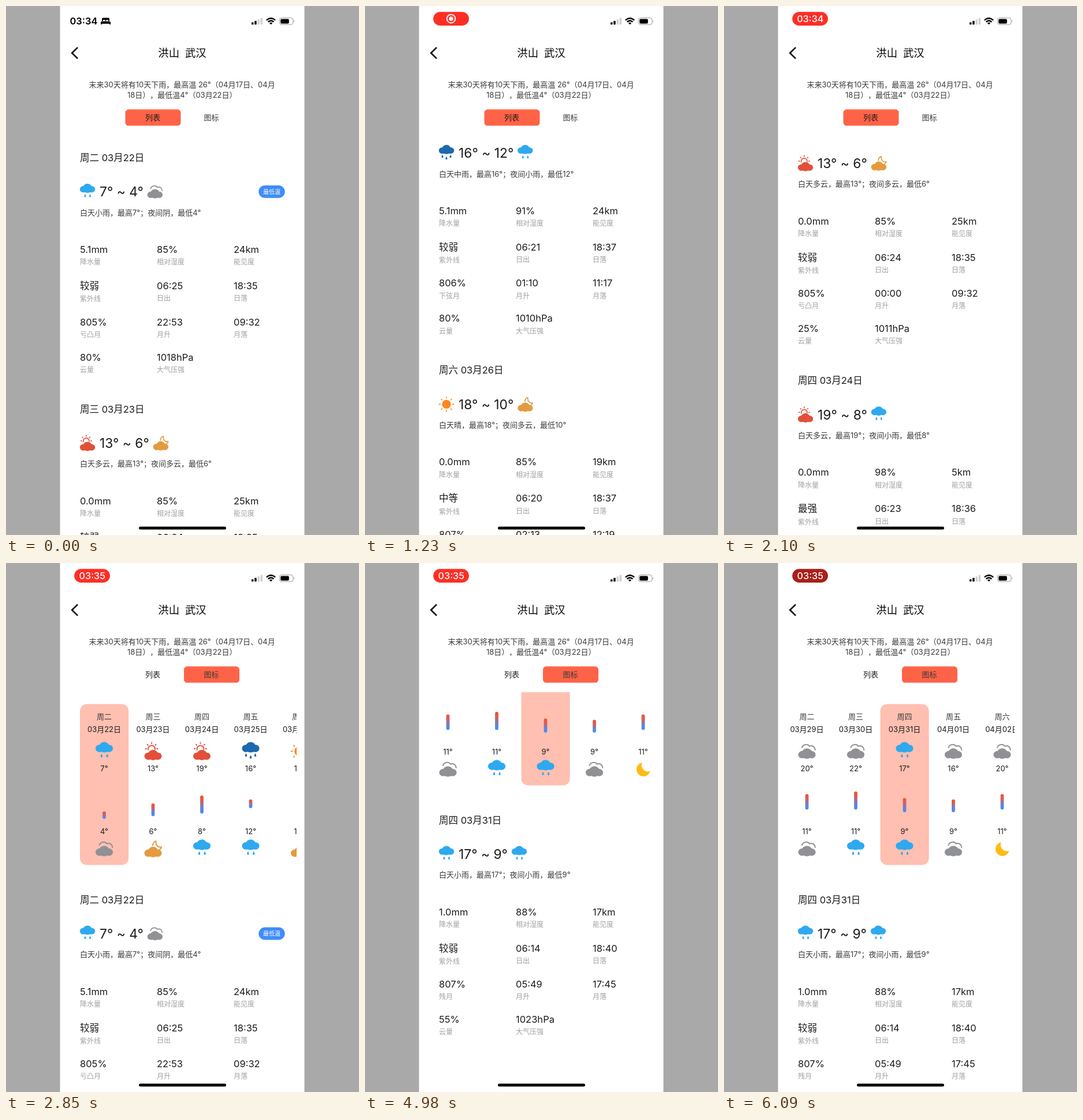
An HTML page for the animation above (6150 ms loop, 611x917 px).

```html
<!DOCTYPE html>
<html lang="zh-CN">
<head>
<meta charset="utf-8">
<title>天气</title>
<style>
html, body { margin: 0; width: 100%; height: 100%; overflow: hidden; background: #a9a9a9; }
svg { display: block; width: 611px; height: 917px; }
text {
  font-family: Inter, "Noto Sans CJK SC", "Noto Sans CJK", sans-serif;
  font-weight: 400; fill: #1c1c1c; white-space: pre; text-spacing-trim: space-all;
}
.soft { fill: #3a3a3a; }
.label { fill: #a0a0a0; }
.mid { text-anchor: middle; }
.bold { font-weight: 600; fill: #000; }
.medium { font-weight: 500; fill: #000; }
.white { fill: #fff; }
.line { fill: none; stroke-linecap: round; stroke-linejoin: round; stroke-width: 1.7; }
</style>
</head>
<body>
<svg id="stage" viewBox="0 0 611 917"></svg>
<script>
const LOOP = 6150, STEP = 30;
const DAY_PITCH = 435.6, COLUMN = 84.5, DETAIL_SHIFT = 320.5;
const LABELS = ['降水量', '相对湿度', '能见度', '紫外线', '日出', '日落', '', '月升', '月落', '云量', '大气压强'];

// weekday, date, day icon, high, night icon, low
const days = [
  ['周二', '03月22日', 'rain', 7, 'overcast', 4],
  ['周三', '03月23日', 'sunCloud', 13, 'moonCloud', 6],
  ['周四', '03月24日', 'sunCloud', 19, 'rain', 8],
  ['周五', '03月25日', 'heavyRain', 16, 'rain', 12],
  ['周六', '03月26日', 'sun', 18, 'moonCloud', 10],
  ['周日', '03月27日', 'sunCloud', 19, 'moonCloud', 11],
  ['周一', '03月28日', 'sunCloud', 20, 'overcast', 11],
  ['周二', '03月29日', 'overcast', 20, 'overcast', 11],
  ['周三', '03月30日', 'overcast', 22, 'rain', 11],
  ['周四', '03月31日', 'rain', 17, 'rain', 9],
  ['周五', '04月01日', 'overcast', 16, 'overcast', 9],
  ['周六', '04月02日', 'overcast', 20, 'moon', 11]
];
const skyNames = { rain: '小雨', heavyRain: '中雨', overcast: '阴', sunCloud: '多云', moonCloud: '多云', sun: '晴' };

// eleven readings followed by the moon phase
const readings = {
  0: '5.1mm 85% 24km 较弱 06:25 18:35 805% 22:53 09:32 80% 1018hPa 亏凸月',
  1: '0.0mm 85% 25km 较弱 06:24 18:35 805% 00:00 09:32 25% 1011hPa 亏凸月',
  2: '0.0mm 98% 5km 最强 06:23 18:36 806% 00:03 10:22 40% 1012hPa 下弦月',
  3: '5.1mm 91% 24km 较弱 06:21 18:37 806% 01:10 11:17 80% 1010hPa 下弦月',
  4: '0.0mm 85% 19km 中等 06:20 18:37 807% 02:13 12:19 25% 1012hPa 残月',
  9: '1.0mm 88% 17km 较弱 06:14 18:40 807% 05:49 17:45 55% 1023hPa 残月'
};

const text = (x, y, size, str, cls = '') =>
  `<text x="${x}" y="${y + size * 0.365}" font-size="${size}" class="${cls}">${str}</text>`;
const rect = (x, y, w, h, r, fill, extra = '') =>
  `<rect x="${x}" y="${y}" width="${w}" height="${h}" rx="${r}" fill="${fill}" ${extra}/>`;
const icon = (name, x, y, scale = 1) =>
  `<use href="#${name}" transform="translate(${x} ${y}) scale(${scale})"/>`;
const group = (id, body, extra = '') => `<g id="${id}" ${extra}>${body}</g>`;

function cloud(dy, color) {
  return `<g fill="${color}" transform="translate(0 ${dy})"><ellipse cy="-4" rx="8" ry="8"/>` +
    '<ellipse cx="-7" cy="-2.3" rx="6.2" ry="5.6"/><ellipse cx="7" cy="-2.3" rx="6.2" ry="5.6"/></g>';
}
const drop = (x, y, color) =>
  `<path d="M${x} ${y}q3.2 5 0 5.4q-3.2 -.4 0 -5.4z" fill="${color}"/>`;
const stroke = (d, color) => `<path class="line" d="${d}" stroke="${color}"/>`;
function rays(cx, cy, inner, outer, from, to, color) {
  let d = '';
  for (let a = from; a <= to; a += 45) {
    const c = Math.cos(a * Math.PI / 180), s = Math.sin(a * Math.PI / 180);
    d += `M${cx + c * inner} ${cy + s * inner}L${cx + c * outer} ${cy + s * outer}`;
  }
  return stroke(d, color);
}

function icons() {
  const blue = '#2ea9ef', navy = '#1c69ad', gray = '#909194', red = '#e25039', amber = '#e39b3e', orange = '#ff861c';
  return group('rain', cloud(0, blue) + drop(-4, 6, blue) + drop(4.5, 6, blue)) +
    group('heavyRain', cloud(0, navy) + drop(-7, 5, navy) + drop(0, 8, navy) + drop(7, 5, navy)) +
    group('overcast', cloud(9.5, gray) + stroke('M-7.5 -3.5C-5.5 -9 2 -9.5 4 -5.5C8 -7.5 12 -5 12.5 0', gray)) +
    group('sunCloud', cloud(11.8, red) + stroke('M-7.2 -.2A5.2 5.2 0 1 1 3 -.8', red) +
      rays(-2.2, -1.8, 8, 9.2, -180, 0, red)) +
    group('moonCloud', cloud(11, amber) + stroke('M-.5 -2.8C-.5 -6 1.5 -9 4.5 -9.8C3.5 -3.5 7.5 .6 13 -.6C12.2 1.4 11.2 2.6 9.8 3.6', amber)) +
    group('sun', `<circle cy="2" r="7.7" fill="${orange}"/>` + rays(0, 2, 10.8, 12.6, 0, 315, orange)) +
    group('moon', '<path d="M-1.5 -7.8A10.5 10.5 0 1 0 10.5 5A9.5 9.5 0 0 1 -1.5 -7.8z" fill="#ffbb14"/>');
}

function detail(index, y) {
  const [week, date, dayIcon, high, nightIcon, low] = days[index];
  const values = readings[index].split(' ');
  const rows = [159, 222, 284.5, 345.5];
  let out = text(128, y, 16.5, `${week} ${date}`) + icon(dayIcon, 141, y + 57) +
    text(162, y + 59, 22.8, `${high}° ~ ${low}°`, 'temp') + icon(nightIcon, 257.5, y + 57) +
    text(128, y + 95, 13, `白天${skyNames[dayIcon]}，最高${high}°；夜间${skyNames[nightIcon]}，最低${low}°`, 'soft');
  if (index === 0) {
    out += rect(437.3, y + 48, 45.4, 21.8, 10.9, '#3f8cfc') + text(460, y + 59, 10, '最低温', 'mid medium white');
  }
  LABELS.forEach((label, i) => {
    const x = 128 + (i % 3) * 133, rowY = y + rows[Math.floor(i / 3)];
    out += text(x, rowY, 16.5, values[i]) +
      text(x, rowY + (i === 3 ? 23 : 22), 12, label || values[11], 'label');
  });
  return out;
}

function chartColumn([week, date, dayIcon, high, nightIcon, low], i) {
  const x = 170 + i * COLUMN, top = 446.6 - 2.3 * high, bottom = 452.6 - 2.3 * low;
  return text(x, 266.5, 13, week, 'mid soft') + text(x, 288, 13, date, 'mid') +
    icon(dayIcon, x, 324, 1.14) + text(x, 356.5, 13, high + '°', 'mid') +
    rect(x - 2.9, top, 5.8, bottom - top, 2.9, 'url(#heat)') +
    text(x, 465, 13, low + '°', 'mid') + icon(nightIcon, x, 493, 1.14);
}

function statusBar() {
  const bars = [0, 1, 2, 3].map(i =>
    rect(425 + i * 5.2, 28.2 - i * 2.5, 3.5, 4 + i * 2.5, 0.9, i < 2 ? '#000' : '#d0d0d0')).join('');
  const wifi = '<g fill="none" stroke="#000" stroke-width="2.4"><path d="M450.8 24.6Q458.5 17.7 466.2 24.6"/>' +
    '<path d="M453.6 27.6Q458.5 23.3 463.4 27.6"/></g><path d="M455.8 29.5Q458.5 27.4 461.2 29.5L458.5 32.3z"/>';
  const battery = rect(473.3, 20.6, 23.6, 11.6, 3.6, 'none', 'stroke="#9a9a9a"') +
    rect(475.2, 22.4, 14.6, 8, 2, '#000') + '<path d="M498.2 24.4q2 2 0 4z" fill="#9a9a9a"/>';
  const bed = '<path d="M166 26v-3.5q0 -2 2 -2h9q2 0 2 2v3.5h-2v-2h-3.7v2h-1.6v-2h-3.7v2z"/>' +
    '<path d="M164 32v-3q0 -2.5 2.5 -2.5h12q2.5 0 2.5 2.5v3h-1.8v-1.3h-13.4v1.3z"/>';
  const record = '<circle cx="149" cy="22" r="7.3" fill="none" stroke="#fff" stroke-width="1.9"/>' +
    '<circle cx="149" cy="22" r="3.8" fill="#fff"/>';
  return bars + wifi + battery +
    group('plainClock', text(110.5, 26.3, 16.4, '03:34', 'bold') + bed) +
    group('pill', rect(118.2, 10.3, 61.7, 23.8, 11.9, '#ff2e24', 'id="pillShape"') + group('record', record) +
      group('pillClock', text(149.3, 22.2, 16.2, '03:34', 'mid medium white')));
}

const stage = document.getElementById('stage');
stage.innerHTML = `<defs>${icons()}
  <linearGradient id="heat" x2="0" y2="1"><stop stop-color="#f8501f"/><stop offset=".15" stop-color="#f0553a"/><stop offset=".85" stop-color="#4a8cf5"/><stop offset="1" stop-color="#3f8cfc"/></linearGradient>
  <clipPath id="page"><rect x="93.5" y="224" width="423" height="693"/></clipPath>
  <clipPath id="strip"><rect x="107" y="200" width="396" height="400"/></clipPath></defs>` +
  rect(0, 0, 611, 917, 0, '#a9a9a9') + rect(93.5, 0, 423, 917, 0, '#fff') +
  group('content',
    group('list', [0, 1, 2, 3, 4].map(i => detail(i, 263 + i * DAY_PITCH)).join('')) +
    group('chart',
      group('stripBox', group('columns', rect(128, 244.5, 84.2, 279, 12, '#ffbfb1', 'id="picked"') +
        days.map(chartColumn).join('')), 'clip-path="url(#strip)"') +
      group('firstDetail', detail(0, 263 + DETAIL_SHIFT)) +
      group('pickedDetail', detail(9, 263 + DETAIL_SHIFT))),
    'clip-path="url(#page)"') +
  statusBar() +
  '<path d="M124 71.8L114.2 81.5L124 91.2" fill="none" stroke="#000" stroke-width="2.6"/>' +
  text(305, 81.5, 18.4, '洪山\u00a0\u00a0武汉', 'mid medium') +
  text(143.5, 136, 13, '末来30天将有10天下雨，最高温 26°（04月17日、04月', 'soft') +
  text(210, 154, 13, '18日），最低温4°（03月22日）', 'soft') +
  rect(206.5, 179.3, 96, 28.2, 5.5, '#ff6347', 'id="tab"') +
  text(254, 193.5, 13, '列表', 'mid') + text(355.5, 193.5, 13, '图标', 'mid soft') +
  rect(230, 902.5, 151, 5, 2.5, '#000');

const el = id => document.getElementById(id);
const show = (id, on) => el(id).setAttribute('display', on ? 'inline' : 'none');
const shift = (id, x, y) => el(id).setAttribute('transform', `translate(${x} ${y})`);
const clamp = v => Math.min(1, Math.max(0, v));
const span = (t, from, to) => clamp((t - from) / (to - from));
const smooth = p => p * p * (3 - 2 * p);
const easeOut = p => 1 - (1 - p) ** 2;

// the night icon follows the temperature text
stage.querySelectorAll('.temp').forEach(temp => {
  const y = +temp.getAttribute('y') - 22.8 * 0.365 - 2;
  temp.nextElementSibling.setAttribute('transform', `translate(${162 + temp.getComputedTextLength() + 20} ${y})`);
});

function render(t) {
  const onChart = t >= 2640, picked = t >= 4020, recording = t >= 30;
  const listY = 1522.5 * (smooth(span(t, 520, 1400)) - smooth(span(t, 1640, 2377.8)));
  const chartX = 618 * easeOut(span(t, 3190, 3729.4));
  const chartY = 138 * (smooth(span(t, 4480, 4860)) - smooth(span(t, 5480, 5900)));

  show('list', !onChart);
  show('chart', onChart);
  shift('list', 0, -listY);
  shift('chart', 0, -chartY);
  shift('columns', -chartX, 0);
  el('picked').setAttribute('x', 128 + (picked ? 9 * COLUMN : 0));
  show('firstDetail', !picked);
  show('pickedDetail', picked);
  el('tab').setAttribute('x', onChart ? 308 : 206.5);

  show('plainClock', !recording);
  show('pill', recording);
  show('record', t < 1620);
  show('pillClock', t >= 1620);
  el('pillClock').firstChild.textContent = t < 2520 ? '03:34' : '03:35';
  const glow = clamp((Math.cos(2 * Math.PI * (t / 740 - 0.78)) + 0.9) / 1.5);
  const mix = (dark, bright) => Math.round(dark + (bright - dark) * glow);
  el('pillShape').setAttribute('fill', `rgb(${mix(171, 255)},${mix(31, 46)},${mix(24, 36)})`);
}

const start = performance.now();
function tick() {
  const t = (performance.now() - start) % LOOP;
  render(Math.min(Math.floor(t / STEP) * STEP, 6090));
  requestAnimationFrame(tick);
}
render(0);
requestAnimationFrame(tick);
</script>
</body>
</html>
```
